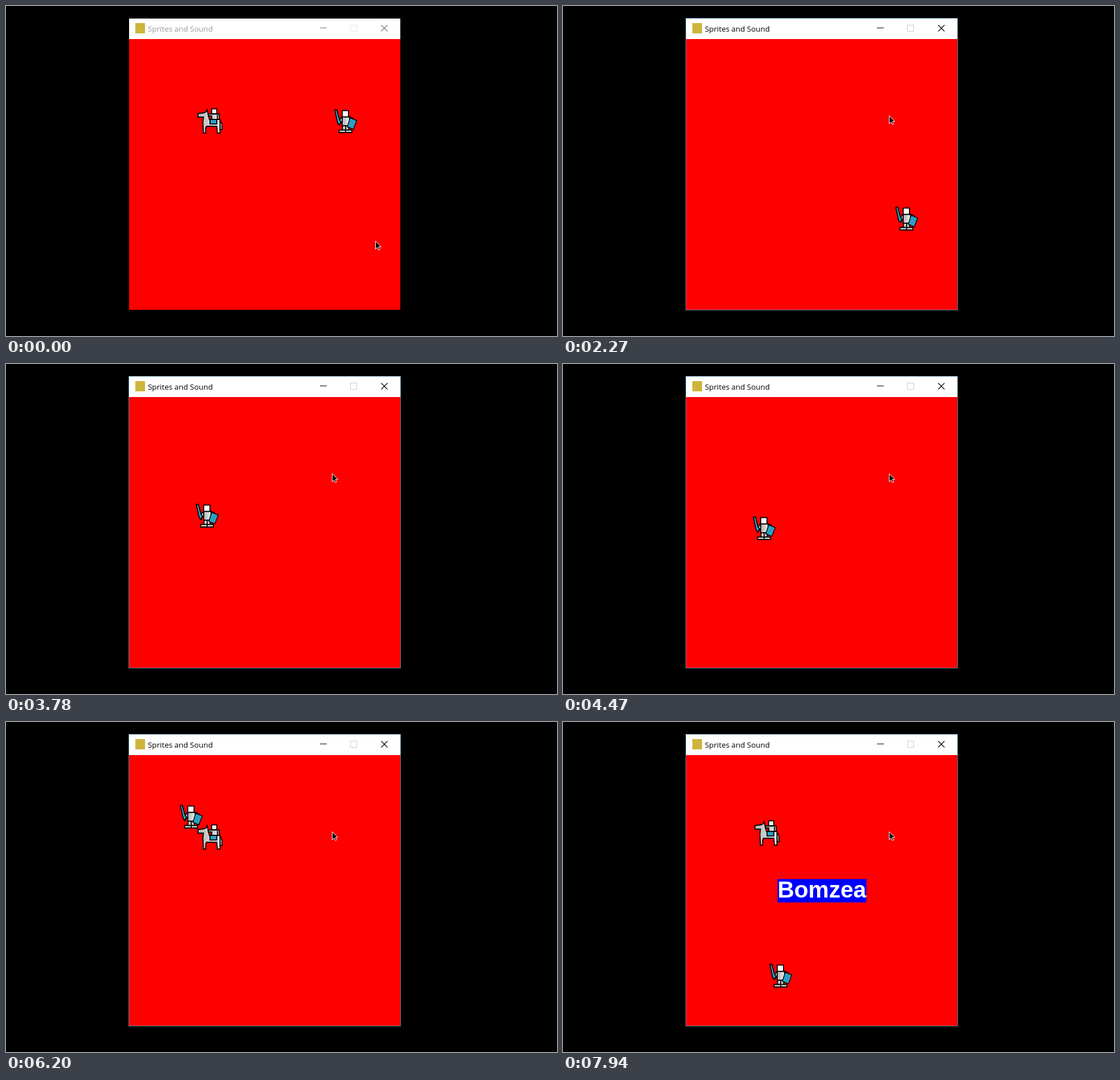
Animation, 967 px wide and 579 px high, one loop 8000 ms. Source, as an HTML page:

```html
<!DOCTYPE html>
<html lang="en">
<head>
<meta charset="utf-8">
<title>Sprites and Sound</title>
<style>
  html, body { margin: 0; width: 100%; height: 100%; overflow: hidden; background: #000; }
  svg { display: block; width: 100%; height: 100%; }
  .title { font: 13.4px "Open Sans", "Noto Sans", sans-serif; }
  .label { font: bold 40.6px "Liberation Sans", Arial, sans-serif; fill: #fff; }
</style>
</head>
<body>
<svg viewBox="0 0 967 579">
  <defs>
    <clipPath id="field"><rect x="216" y="58" width="476" height="475"/></clipPath>
    <linearGradient id="steel">
      <stop offset="0" stop-color="#b4b4b4"/>
      <stop offset="1" stop-color="#ececec"/>
    </linearGradient>
  </defs>

  <rect width="967" height="579" fill="#000"/>
  <rect x="216" y="22" width="476" height="36" fill="#fff"/>
  <rect x="216" y="58" width="476" height="475" fill="#f00"/>
  <rect id="border" x="215.5" y="21.5" width="477" height="512" fill="none"/>

  <rect x="227" y="30" width="17" height="18" fill="#cdb53c"/>
  <text id="title" class="title" x="249" y="45">Sprites and Sound</text>
  <g id="buttons" fill="none">
    <path d="M551 38.5h12"/>
    <path d="M658.5 33.5l11 11M669.5 33.5l-11 11" stroke-width="1.2"/>
  </g>
  <rect id="maxBox" x="604.5" y="33.5" width="11" height="11" fill="none"/>

  <g clip-path="url(#field)">
    <g id="label">
      <rect x="376.5" y="275.5" width="156" height="41" fill="#00f"/>
      <text class="label" x="376.5" y="308">Bomzea</text>
    </g>

    <g id="cherry">
      <rect width="24" height="24" fill="#000"/>
      <path d="M7 10Q10 4 18 3M15 13Q13 7 18 3M11 3h9" fill="none" stroke="#0a9a1c" stroke-width="1.8"/>
      <ellipse cx="7" cy="14" rx="5.5" ry="6" fill="#f01010"/>
      <ellipse cx="16.5" cy="16.5" rx="6" ry="6" fill="#f01010" stroke="#000" stroke-width=".8"/>
      <path d="M4 13l2-2M13 16l2-2" stroke="#fff" stroke-width="1.6"/>
    </g>

    <g id="horse" stroke="#000" stroke-width="1.8">
      <path d="M39 21L43 28V38H40Z" fill="#ddd"/>
      <path d="M1 9.5L11 8.5L16 6L17 3L19 12L21 20H39.5V44H35L34 32H16L14.5 35V44H10.5L9.5 25L10.5 16H1Z" fill="url(#steel)"/>
      <path d="M19 10.5H38V20H25V14H19Z" fill="url(#steel)"/>
      <path d="M35 12V20" fill="none"/>
      <rect x="25" y="1.5" width="9" height="8.5" fill="#fff"/>
      <rect x="22" y="20" width="12" height="8" fill="#2c9fc2"/>
    </g>

    <g id="knight" stroke="#000" stroke-width="1.8">
      <path d="M14 13L8 21L11 25L16 19ZM26 13L33 16L29 20L25 18Z" fill="#ccc"/>
      <rect x="14.5" y="29" width="11" height="8" fill="#d0d0d0"/>
      <rect x="14" y="13.5" width="13" height="15.5" fill="url(#steel)"/>
      <path d="M8.5 36.5H31V41H8.5ZM20 30V41" fill="#d0d0d0"/>
      <rect x="14" y="2.5" width="11" height="11" fill="#fff"/>
      <path d="M1 1.5L4.500 1L9.500 19L12 22L9 28L6 24L5 20Z" fill="#2c9fc2"/>
      <path d="M28 15L39.5 20L33.500 35.500L23 31Z" fill="#2c9fc2" stroke-width="1.4"/>
    </g>
  </g>

  <path id="cursor" d="M.5 .5V14.500L3.800 11.500L6 16L8.200 15L6.100 10.500H10.200Z" fill="#000" stroke="#fff"/>
</svg>

<script>
const $ = id => document.getElementById(id);
const LOOP = 8000, FRAME = 134.5, STEP = 7.14;

// Turning points of the knight: frame, column, row
const route = [
  [10, 0, 0], [11, 1, 0], [18, 1, 34], [20, 0, 34], [23, -14, 34], [28, -34, 9], [30, -34, -1],
  [36, -34, 24], [38, -34, 13], [43, -50, -5], [46, -38, -5], [48, -30, 4],
  [53, -50, 9], [54, -50, 9], [59, -30, 34]
];

function knightCell(frame) {
  if (frame <= route[0][0]) return [0, 0];
  const i = route.findIndex(p => p[0] >= frame);
  const [from, to] = [route[i - 1], route[i]];
  const part = (frame - from[0]) / (to[0] - from[0]);
  return [1, 2].map(j => Math.round(from[j] + (to[j] - from[j]) * part));
}

const place = (id, x, y) =>
  $(id).setAttribute('transform', `translate(${Math.round(x)} ${Math.round(y)})`);
const show = (id, on) => $(id).setAttribute('visibility', on ? 'visible' : 'hidden');
const paint = (id, attr, color) => $(id).setAttribute(attr, color);

function draw(time) {
  const frame = Math.floor(time / FRAME);

  const active = frame >= 3;
  paint('border', 'stroke', active ? '#4a7f9c' : 'none');
  paint('title', 'fill', active ? '#000' : '#999');
  paint('buttons', 'stroke', active ? '#000' : '#777');
  paint('maxBox', 'stroke', active ? '#ccc' : '#e6e6e6');

  const move = Math.min(1, frame / 2);
  place('cursor', 648 - 76 * move, 412 - 220 * move);

  const [col, row] = knightCell(frame);
  place('knight', 576 + col * STEP, 181 + row * STEP);

  // The horse rides out to the left, later returns to its start
  const ride = frame < 42 ? Math.round(4.8 * Math.max(0, frame - 7)) : 0;
  place('horse', 336 - ride * STEP, frame < 59 ? 179 : 179 - STEP);

  // Three cherries shoot down across the field, each starting further left
  const shot = Math.floor((frame - 21) / 9), age = (frame - 21) % 9;
  show('cherry', shot >= 0 && shot < 3);
  place('cherry', 668 - 155 * shot - 82 * age, 59 + 204 * age);

  show('label', frame >= 47);
}

function loop() {
  draw(performance.now() % LOOP);
  requestAnimationFrame(loop);
}
loop();
</script>
</body>
</html>
```
